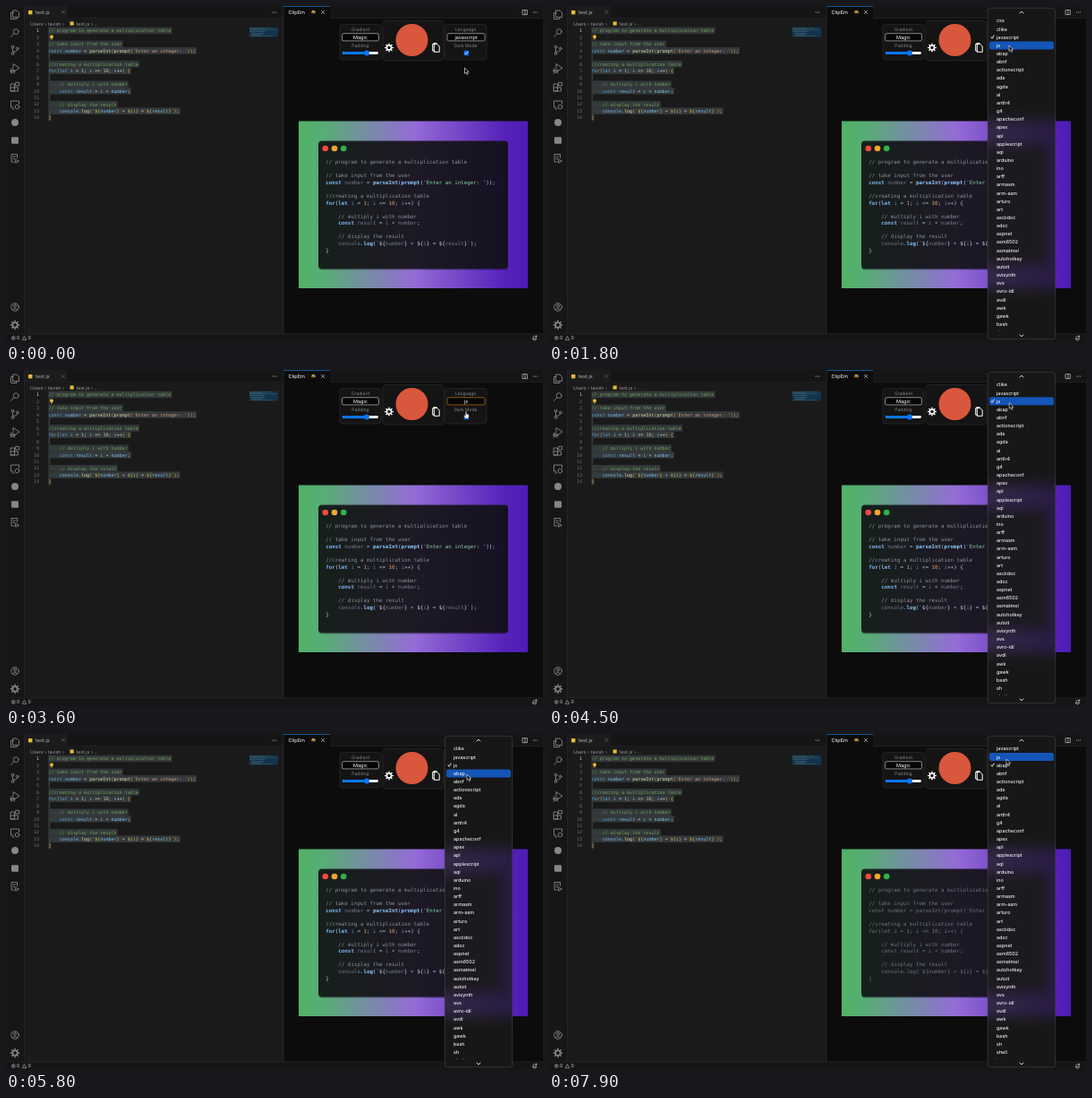
An HTML page that plays this animation: 600x375 px, repeating every 8 s.

```html
<!DOCTYPE html>
<html lang="en">
<head>
<meta charset="utf-8">
<title>Code snapshot panel</title>
<style>
html, body { margin: 0; width: 100%; height: 100%; overflow: hidden; background: #0b0b0b; }
svg { display: block; width: 600px; height: 375px; }
text { white-space: pre; font-family: Inter, Roboto, sans-serif; text-rendering: geometricPrecision; }
.mono { font-family: "DejaVu Sans Mono", monospace; }
.line { fill: none; stroke: #868686; stroke-width: .9; stroke-linejoin: round; stroke-linecap: round; }
</style>
</head>
<body>
<svg id="stage" viewBox="0 0 600 375">
  <defs>
    <linearGradient id="magic">
      <stop offset="0" stop-color="#4fb266"/>
      <stop offset=".1" stop-color="#57ae74"/>
      <stop offset=".5" stop-color="#946cd6"/>
      <stop offset=".9" stop-color="#5522b9"/>
      <stop offset="1" stop-color="#4e1cb6"/>
    </linearGradient>
    <filter id="blur" filterUnits="userSpaceOnUse" x="440" y="80" width="160" height="290">
      <feGaussianBlur stdDeviation="8"/>
    </filter>
    <clipPath id="frame"><rect x="490" y="2" width="76" height="370" rx="3"/></clipPath>
    <clipPath id="rows"><rect x="490" y="11.5" width="76" height="351"/></clipPath>
  </defs>
  <g id="base"></g>
  <g id="plain"></g>
  <g id="coloured"></g>
  <g id="menu">
    <g clip-path="url(#frame)">
      <rect x="490" y="2" width="76" height="370" fill="#0c0c0c"/>
      <g filter="url(#blur)">
        <rect x="327" y="128.5" width="256" height="186.5" fill="url(#magic)"/>
        <rect x="349" y="150.5" width="212" height="143" fill="#1c1726"/>
      </g>
      <rect x="490" y="2" width="76" height="370" fill="#1c1c1c" opacity=".72"/>
    </g>
    <rect x="490.3" y="2.3" width="75.4" height="369.6" rx="3" fill="none" stroke="#48484c" stroke-width=".6"/>
    <rect id="hover" x="492" width="72" height="9" rx="2" fill="#1455b8"/>
    <path class="line" style="stroke:#e8e8e8" d="M526 8l2-2 2 2M526 367l2 2 2-2"/>
    <g clip-path="url(#rows)"><g id="list"></g></g>
    <path class="line" style="stroke:#fff" d="M494 34.8l1.2 1.5 2-3.4"/>
  </g>
  <g id="cursor">
    <path id="arrow" d="M0 0v6.3l1.5-1.3 1 2.4 1.2-.5-1-2.3h2z" fill="#000" stroke="#fff" stroke-width=".6"/>
    <path id="hand" d="M-.7 0q.7-.7 1.4 0v2.6l2.4.7v2.4l-.7 1.8h-3l-2-2.7.7-.6 1.2.8z" fill="#fff" stroke="#111" stroke-width=".4"/>
  </g>
</svg>
<script>
const $ = id => document.getElementById(id);
const esc = s => s.replace(/&/g, '&amp;').replace(/</g, '&lt;');
const text = (x, cy, s, size, fill, more = '') =>
  `<text x="${x}" y="${cy + size * .36}" font-size="${size}" fill="${fill}" ${more}>${esc(s)}</text>`;
const mid = 'text-anchor="middle"';
const rect = (x, y, w, h, fill, more = '') =>
  `<rect x="${x}" y="${y}" width="${w}" height="${h}" fill="${fill}" ${more}/>`;
const dot = (x, y, r, fill) => `<circle cx="${x}" cy="${y}" r="${r}" fill="${fill}"/>`;
const line = (d, style = '') => `<path class="line" d="${d}" style="${style}"/>`;
const ring = (x, y, r) => `<circle class="line" cx="${x}" cy="${y}" r="${r}"/>`;
const dots = x => [-2, 0, 2].map(d => dot(x + d, 7, .55, '#c5c5c5')).join('');
const cross = (x, c) => line(`M${x - 1.7} 5.3l3.4 3.4m0-3.4l-3.4 3.4`, `stroke:${c};stroke-width:.6`);
const gear = (x, y, r, c) => {
  let teeth = '';
  for (let a = 0; a < 8; a++) {
    const u = Math.cos(a * Math.PI / 4), v = Math.sin(a * Math.PI / 4);
    teeth += `M${x + u * r * .75} ${y + v * r * .75}L${x + u * r} ${y + v * r}`;
  }
  return `<circle cx="${x}" cy="${y}" r="${r * .58}" fill="none" stroke="${c}" stroke-width="${r * .34}"/>` +
    line(teeth, `stroke:${c};stroke-width:${r * .34}`);
};

// Code
const code = `// program to generate a multiplication table

// take input from the user
const number = parseInt(prompt('Enter an integer: '));

//creating a multiplication table
for(let i = 1; i <= 10; i++) {

    // multiply i with number
    const result = i * number;

    // display the result
    console.log(\`\${number} * \${i} = \${result}\`);
}`.split('\n');
const tokenRule = /(?<comment>\/\/.*)|(?<key>\b(?:const|let|for)\b)|(?<str>'[^']*'|`)|(?<num>\d+)|(?<fn>\w+(?=\())|(?<name>\w+)|(?<brace>[{}()$])|(?<space> +)|(?<star>\*)|(?<op>[^\w\s])/g;
const editorTheme = {
  comment: '#6fa05a', key: '#5aa3e0', str: '#d6987f', num: '#b5cea8', fn: '#e0e0b0',
  name: '#76c2f2', brace: '#e0c040', op: '#dcdcdc', star: '#dcdcdc'
};
const cardTheme = {
  comment: '#8c8f98', key: '#7db8f2', str: '#86d3a5', num: '#e3a564', fn: '#8cc6fb',
  name: '#727a8c', brace: '#c3d3ec', op: '#9fbfe6', star: '#9fbfe6'
};
const plainTheme = Object.fromEntries(Object.keys(cardTheme).map(k => [k, '#6d7280']));

function codeBlock(x, y, pitch, size, theme, bold, marks) {
  return code.map((row, i) => {
    let spans = '';
    for (const m of row.matchAll(tokenRule)) {
      const kind = Object.keys(m.groups).find(k => m.groups[k] !== undefined);
      let s = esc(m[0]);
      if (marks) s = s.replace(/ /g, '<tspan fill="#59605c">·</tspan>');
      const weight = bold && (kind === 'key' || kind === 'fn') ? ' font-weight="700"' : '';
      const drop = kind === 'star' ? ' baseline-shift="-.15em"' : '';
      spans += `<tspan fill="${theme[kind] || '#888'}"${weight}${drop}>${s}</tspan>`;
    }
    return `<text class="mono" x="${x}" y="${y + i * pitch + size * .36}" font-size="${size}">${spans}</text>`;
  }).join('');
}

// Editor frame
let out = rect(0, 0, 310, 375, '#1a1a1a') + rect(20, 0, 290, 14, '#151515') + rect(20, 0, 49, 14, '#1c1c1c') +
  rect(0, 0, 20, 366, '#161616') + rect(20, 0, .5, 366, '#2b2b2b') +
  rect(310, 0, 290, 375, '#0c0c0c') + rect(310, 0, 290, 14, '#151515') + rect(310, 0, 52, 14, '#0c0c0c') +
  rect(310, 0, 52, .7, '#1479d4') + rect(309.7, 0, .6, 366, '#343434') +
  rect(69, 13.6, 241, .4, '#2b2b2b') + rect(362, 13.6, 238, .4, '#2b2b2b') +
  rect(0, 366, 600, 9, '#151515') + rect(0, 365.7, 600, .5, '#2e2e2e');
out += rect(25, 5, 4.4, 4.4, '#e5b93a') + text(33, 7, 'test.js', 5.6, '#b5b5b5') + cross(64, '#666') + dots(300) +
  text(315.5, 7, 'ClipEm', 5.6, '#fff') + rect(341.2, 5.6, 4.8, 2.6, '#a5793a', 'rx=".8"') +
  rect(342, 5, 2.4, 1.1, '#d9b866') + cross(354, '#e0e0e0') +
  line('M577.4 4.6h5v5h-5zM579.9 4.6v5', 'stroke:#c5c5c5;stroke-width:.7') + dots(591.5);
out += text(27, 19.6, 'Users › tavish ›', 5.3, '#9a9a9a') + rect(71.5, 17.4, 4.2, 4.2, '#e5b93a') +
  text(78.5, 19.6, 'test.js › ...', 5.3, '#9a9a9a');

// Activity bar
out += line('M8 5h4l2.5 2.5v5H8zM8 7.5H5.5v7H12v-2') + ring(11.2, 28.6, 2.9) + line('M9 30.8l-3.6 3.6') +
  ring(7.5, 45.6, 1.4) + ring(7.5, 53, 1.4) + ring(12.7, 47.5, 1.4) + line('M7.5 47v4.6M12.7 49q0 2.2-5.2 2.2') +
  line('M8 69v-4.5l7 4.5-4.5 3') + ring(7.5, 72.5, 2) + line('M4.5 72.5h6M5 70l1 .8M5 75l1-.8M10 75l-1-.8') +
  line('M5.5 87h4v8h-4zM5.5 91h8v4h-8M11 85.4h3.6V89H11z') +
  line('M8 113H5.5v-7h9v3M7 115h2') + ring(12.5, 112.5, 2.3) +
  dot(10, 130, 4, '#868686') + rect(6, 146.2, 8, 7.6, '#868686', 'rx="1"') +
  line('M9 174H6v-8.5h6.5v4M8 168h2.5M8 170.4h2M11 171.5l3.5 1.7-3.5 1.8z') +
  ring(10, 336, 4.3) + ring(10, 334.7, 1.5) + line('M7.3 339q2.7-3 5.4 0') + gear(10, 356, 4.6, '#868686');
out += `<circle cx="8.3" cy="370.5" r="1.9" fill="none" stroke="#bbb" stroke-width=".6"/>` +
  line('M7.5 369.7l1.6 1.6m0-1.6l-1.6 1.6M18.3 372.4l2.1-3.9 2.1 3.9z', 'stroke:#bbb;stroke-width:.6') +
  text(12, 370.5, '0', 5.3, '#ccc') + text(24.5, 370.5, '0', 5.3, '#ccc') +
  line('M588.4 371.8h4.4l-.7-1v-1.4q-1.5-2-3 0v1.4zM590 373h1.2', 'stroke:#ccc;stroke-width:.7') + dot(592.6, 368.6, .8, '#ccc');

// Left code with its selection
const pitch = 7.48, top0 = 27.4, advance = 3.05;
code.forEach((row, i) => {
  const y = top0 + i * pitch;
  out += rect(47.3, y - pitch / 2, Math.max(2, row.length * advance + (i < 13 ? 1 : 0)), pitch, '#33383a') +
    text(37, y, String(i + 1), 5, i ? '#737373' : '#d0d0d0', 'class="mono" text-anchor="end"');
});
out += codeBlock(47.5, top0, pitch, advance / .602, editorTheme, false, true);
out += dot(51, 34.2, 1.9, '#f0bd2c') + rect(50.1, 36, 1.8, 1.4, '#c99a25');
out += rect(272, 23.7, 32, 10.8, '#15324c');
code.forEach((row, i) => {
  const pad = row.search(/\S/);
  if (pad >= 0) out += rect(272 + pad * .55, 24 + i * .76, (row.length - pad) * .55, .45, i % 3 ? '#3c6b93' : '#407060');
});

// Control boxes
const panel = (x, y, w, h) => rect(x, y, w, h, '#141414', 'rx="3" stroke="#303030" stroke-width=".6"');
const label = (x, y, s) => text(x, y, s, 5, '#858585', mid);
out += panel(373, 20.5, 46, 39.5) + panel(421, 16.5, 68, 44.5) + panel(490.5, 20.5, 46.5, 39.5) +
  label(396, 26.5, 'Gradient') + label(396, 44.5, 'Padding') +
  rect(375.5, 30.7, 41, 8.2, '#050505', 'rx="1.6" stroke="#d8d8d8" stroke-width=".6"') +
  text(396, 34.8, 'Magic', 5.5, '#fff', mid) +
  rect(376, 51.1, 40, 2.8, '#e8e8e8', 'rx="1.4"') + rect(376, 51.1, 27, 2.8, '#0a75f5', 'rx="1.4"') + dot(403, 52.5, 2.9, '#0a75f5') +
  gear(428, 46.5, 4.3, '#fff') + dot(453.5, 38, 18, '#d9573c') +
  line('M478.5 42.5h-1.8v7.6h2M478.7 42.5h3l2.5 2.5v6.3h-5.5zM478 41.5h3', 'stroke:#fff;stroke-width:1') +
  label(513.5, 26.5, 'Language') + label(513.5, 44.5, 'Dark Mode') +
  `<rect id="box" x="493" y="30.7" width="42" height="8.2" rx="1.6" fill="#050505" stroke-width=".6"/>` +
  text(514, 34.8, 'javascript', 5.5, '#fff', mid + ' id="choice"') +
  rect(511.7, 49.8, 5.4, 5.4, '#0a75f5', 'rx="1"') + line('M513 52.6l1 1.2 1.8-2.6', 'stroke:#fff;stroke-width:.7');

// Snapshot card
out += rect(327, 128.5, 256, 186.5, 'url(#magic)') + rect(349, 152, 212, 143, '#000', 'rx="4" opacity=".18"') +
  rect(349, 150.5, 212, 143, '#101013', 'rx="4" opacity=".88"') +
  ['#f2493f', '#f5a729', '#2fb24a'].map((c, i) => dot(356.8 + i * 10.2, 159, 3.3, c)).join('');
$('base').innerHTML = out;
$('coloured').innerHTML = codeBlock(357.3, 174, 7.58, 5.83, cardTheme, true);
$('plain').innerHTML = codeBlock(357.3, 174, 7.58, 5.83, plainTheme, false);

// Language list
const rowH = 9.15, rowTop = 11.95;
const langs = ('css clike javascript js abap abnf actionscript ada agda al antlr4 g4 apacheconf apex apl applescript ' +
  'aql arduino ino arff armasm arm-asm arturo art asciidoc adoc aspnet asm6502 asmatmel autohotkey autoit avisynth ' +
  'avs avro-idl avdl awk gawk bash sh shell basic').split(' ');
$('list').innerHTML = langs.map((s, i) => text(500, 16.5 + i * rowH, s, 5.35, '#f2f2f2', 'font-weight="500"')).join('');

// Pointer tip: time, x, y
const path = [
  [0, 512.5, 69], [200, 512.5, 68], [500, 514, 37], [750, 515, 36], [1100, 523.5, 38], [1450, 521, 38], [1800, 514, 44],
  [2300, 513, 45], [2700, 513, 46], [3100, 513, 46], [3600, 514, 46.5], [3850, 514, 45], [4100, 514, 37],
  [4400, 514, 36], [4900, 516, 43], [5400, 515.5, 46], [5900, 515, 45], [6300, 514, 43], [6800, 514, 38],
  [7200, 513, 37], [7600, 511, 33], [7900, 511, 28], [8000, 511, 28]
];
function tip(t) {
  const i = Math.max(1, path.findIndex(p => p[0] > t)), a = path[i - 1], b = path[i];
  const u = (t - a[0]) / (b[0] - a[0]), e = u * u * (3 - 2 * u);
  return [a[1] + (b[1] - a[1]) * e, a[2] + (b[2] - a[2]) * e];
}
const show = (id, on) => $(id).setAttribute('visibility', on ? 'visible' : 'hidden');
const open = [[700, 3100], [4200, 5900], [7000, 8000]];

function draw(t) {
  const [x, y] = tip(t);
  const picked = t < 3100 ? 2 : t < 5900 ? 3 : 4;
  const menuOn = open.some(([a, b]) => t >= a && t < b);
  show('menu', menuOn);
  show('coloured', picked < 4);
  show('plain', picked === 4);
  show('hand', !menuOn && t > 3200 && t < 4000);
  show('arrow', menuOn || t <= 3200 || t >= 4000);
  $('choice').textContent = langs[picked];
  $('box').setAttribute('stroke', t < 700 ? '#d8d8d8' : '#d98a1c');
  $('list').setAttribute('transform', `translate(0 ${-(picked - 2) * rowH})`);
  $('hover').setAttribute('y', rowTop + Math.floor((y - rowTop) / rowH) * rowH);
  $('cursor').setAttribute('transform', `translate(${x} ${y})`);
}
function tick() {
  draw(Math.floor(performance.now() % 8000 / 100) * 100);
  requestAnimationFrame(tick);
}
tick();
</script>
</body>
</html>
```
